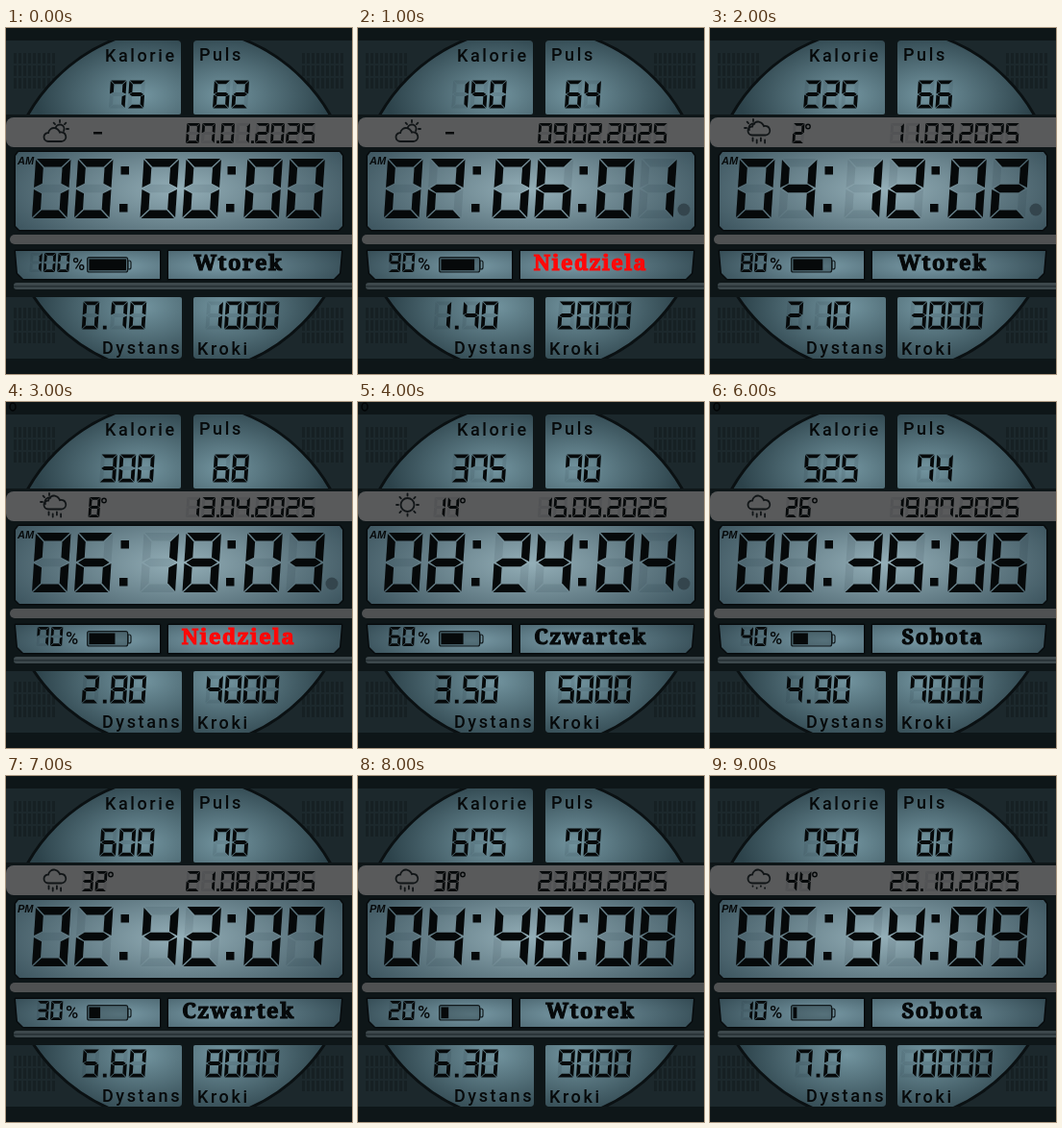
An HTML page with a canvas for the animation above (10000 ms loop, 360 by 360 pixels).

```html
<!DOCTYPE html>
<html lang="pl">
<head>
<meta charset="utf-8">
<title>Watch face</title>
<style>
  html, body { margin: 0; width: 100%; height: 100%; overflow: hidden; background: #0c1315; }
  canvas { display: block; }
</style>
</head>
<body>
<canvas id="face" width="360" height="360"></canvas>
<script>
const ctx = document.getElementById('face').getContext('2d');
const INK = '#06090a';
const GHOST = 'rgba(10, 25, 32, 0.09)';
const SLANT = 0.065;
const DIGITS = ['abcdef', 'bc', 'abged', 'abgcd', 'fgbc', 'afgcd', 'afgedc', 'fabc', 'abcdefg', 'abcdfg'];
const WEEKDAYS = ['Niedziela', 'Poniedziałek', 'Wtorek', 'Środa', 'Czwartek', 'Piątek', 'Sobota'];
const WEATHER = ['partly', 'partly', 'shower', 'shower', 'sun', 'sun', 'rain', 'rain', 'rain', 'snow'];
const pad = n => String(n).padStart(2, '0');

function polygon(points, color) {
  ctx.beginPath();
  points.forEach(([x, y]) => ctx.lineTo(x, y));
  ctx.closePath();
  ctx.fillStyle = color;
  ctx.fill();
}

function box(x, y, w, h, r, fill, stroke) {
  ctx.beginPath();
  ctx.roundRect(x, y, w, h, r);
  if (fill) { ctx.fillStyle = fill; ctx.fill(); }
  if (stroke) { ctx.strokeStyle = stroke; ctx.stroke(); }
}

function label(text, x, y, font, { color = INK, align = 'left', spacing = 0, weight = 0 } = {}) {
  ctx.font = font;
  ctx.textAlign = align;
  ctx.letterSpacing = spacing + 'px';
  ctx.fillStyle = ctx.strokeStyle = color;
  ctx.fillText(text, x, y);
  if (weight) {
    ctx.lineWidth = weight;
    ctx.strokeText(text, x, y);
  }
}

function segments(w, h, t) {
  const m = h / 2, gap = t * 0.12;
  const top = [[gap, 0], [w - gap, 0], [w - t - gap, t], [t + gap, t]];
  const side = [[w, gap], [w, m - gap], [w - t, m - t / 2 - gap], [w - t, t + gap]];
  const flipX = p => p.map(([x, y]) => [w - x, y]);
  const flipY = p => p.map(([x, y]) => [x, h - y]);
  return {
    a: top, b: side, c: flipY(side), d: flipY(top), e: flipX(flipY(side)), f: flipX(side),
    g: [[2 * gap, m], [t, m - t / 2], [w - t, m - t / 2], [w - 2 * gap, m], [w - t, m + t / 2], [t, m + t / 2]]
  };
}

function digit(value, x, y, w, h, t) {
  ctx.save();
  ctx.transform(1, 0, -SLANT, 1, x + h * SLANT, y);
  for (const [name, points] of Object.entries(segments(w, h, t)))
    polygon(points, DIGITS[value].includes(name) ? INK : GHOST);
  ctx.restore();
}

// Draws digits and dots, returning the x position after the last one.
function number(text, x, y, h, pitch, dot, t) {
  for (const char of text) {
    if (char === '.') {
      ctx.fillStyle = INK;
      ctx.fillRect(x + dot / 2 - t / 2 - 0.5, y + h - t, t, t);
      x += dot;
    } else {
      digit(+char, x, y, pitch - h * SLANT - 1, h, t);
      x += pitch;
    }
  }
  return x;
}

function centred(text, cx, y) {
  const pitch = 19.5, dot = 10;
  const width = [...text].reduce((sum, c) => sum + (c === '.' ? dot : pitch), 0);
  number(text, cx - width / 2, y, 29, pitch, dot, 3.8);
}

function glow(cx, cy, rx, ry, inner, outer) {
  ctx.save();
  ctx.translate(cx, cy);
  ctx.scale(rx, ry);
  const g = ctx.createRadialGradient(0, 0, 0, 0, 0, 1);
  g.addColorStop(0, inner);
  g.addColorStop(1, outer);
  ctx.fillStyle = g;
  ctx.fillRect(-3, -3, 6, 6);
  ctx.restore();
}

function dialPanel(x, y, w, h, corners, cx, cy) {
  ctx.save();
  ctx.beginPath();
  ctx.roundRect(x, y, w, h, corners);
  ctx.clip();
  ctx.fillStyle = '#1c282c';
  ctx.fillRect(x, y, w, h);
  ctx.fillStyle = '#162023';
  const gridX = x < 180 ? 8 : 308, gridY = y < 180 ? 26 : 291;
  for (let i = 0; i < 9; i++)
    for (let j = 0; j < 3; j++) ctx.fillRect(gridX + i * 5, gridY + j * 13, 3, 11);
  ctx.beginPath();
  ctx.arc(180, 180, 181, 0, 7);
  ctx.save();
  ctx.clip();
  glow(cx, cy, 112, 68, '#72949f', '#2c424a');
  ctx.restore();
  ctx.strokeStyle = '#0a1012';
  ctx.lineWidth = 3;
  ctx.stroke();
  ctx.restore();
}

function panel(points, cx, cy, rx, ry, inner, outer) {
  ctx.save();
  ctx.beginPath();
  points.forEach(([x, y]) => ctx.lineTo(x, y));
  ctx.closePath();
  ctx.lineJoin = 'round';
  ctx.lineWidth = 3;
  ctx.strokeStyle = '#070b0d';
  ctx.stroke();
  ctx.clip();
  glow(cx, cy, rx, ry, inner, outer);
  ctx.restore();
}

function background() {
  ctx.fillStyle = '#0e1618';
  ctx.fillRect(0, 0, 360, 360);
  dialPanel(0, 13, 182, 77, [0, 4, 2, 0], 142, 70);
  dialPanel(195, 13, 165, 77, [4, 0, 0, 2], 226, 70);
  dialPanel(0, 280, 183, 64, [0, 2, 4, 0], 142, 290);
  dialPanel(195, 280, 165, 64, [2, 0, 0, 4], 226, 290);
  box(0, 93, 364, 31, [8, 0, 0, 8], '#595a5b');
  box(4, 215, 360, 10, [5, 0, 0, 5], '#4f5152');
  box(8, 265, 356, 7, [3, 0, 0, 3], '#3d484c');
  ctx.fillStyle = '#263034';
  ctx.fillRect(8, 268, 352, 1.5);
  panel([[13, 129], [347, 129], [350, 133], [350, 206], [346, 210], [14, 210], [10, 206], [10, 133]],
    180, 168, 205, 78, '#94afb8', '#3b535d');
  panel([[10, 232], [160, 232], [160, 261], [18, 261], [12, 255]], 118, 248, 130, 34, '#7899a5', '#334a53');
  panel([[169, 232], [349, 232], [347, 255], [341, 261], [169, 261]], 222, 248, 145, 34, '#7899a5', '#334a53');
  const font = '500 18px Roboto, sans-serif', spacing = 2.6;
  label('Kalorie', 103, 35, font, { spacing });
  label('Puls', 201, 34, font, { spacing });
  label('Dystans', 100, 339, font, { spacing });
  label('Kroki', 199, 340, font, { spacing });
}

function sun(x, y, r, from, to) {
  ctx.beginPath();
  ctx.arc(x, y, r, from, to);
  ctx.stroke();
  for (let a = Math.PI / 4 * Math.ceil(from / (Math.PI / 4)); a <= to; a += Math.PI / 4) {
    ctx.beginPath();
    ctx.moveTo(x + Math.cos(a) * (r + 2.5), y + Math.sin(a) * (r + 2.5));
    ctx.lineTo(x + Math.cos(a) * (r + 4.5), y + Math.sin(a) * (r + 4.5));
    ctx.stroke();
  }
}

function cloud(x, y) {
  ctx.beginPath();
  ctx.moveTo(x + 5, y + 14);
  ctx.arc(x + 5, y + 9.5, 4.5, Math.PI / 2, Math.PI * 1.45);
  ctx.arc(x + 11, y + 6, 6, Math.PI * 1.05, Math.PI * 1.85);
  ctx.arc(x + 18.5, y + 9.2, 4.8, Math.PI * 1.4, Math.PI / 2);
  ctx.closePath();
  ctx.stroke();
}

function weatherIcon(kind) {
  ctx.strokeStyle = '#111517';
  ctx.lineWidth = 1.8;
  ctx.lineCap = 'round';
  if (kind === 'sun') {
    sun(51.5, 107, 7, 0, Math.PI * 1.99);
  } else if (kind === 'partly') {
    sun(56, 105, 4.5, Math.PI * 1.1, Math.PI * 2.15);
    cloud(39, 104);
  } else {
    if (kind === 'shower') sun(45, 104, 4.5, Math.PI * 0.85, Math.PI * 1.6);
    cloud(39, 97.5);
    for (let i = 0; i < 4; i++) {
      const x = 44.5 + i * 4.2, y = 114.5 + (i % 2) * 2;
      ctx.beginPath();
      ctx.moveTo(x, y);
      ctx.lineTo(x, y + (kind === 'snow' ? 0.3 : 3));
      ctx.stroke();
    }
  }
  ctx.lineCap = 'butt';
}

function colon(x) {
  ctx.fillStyle = INK;
  ctx.fillRect(x + 1.5, 144, 8.5, 8.5);
  ctx.fillRect(x, 183, 8.5, 8.5);
}

function pair(value, x) {
  [...pad(value)].forEach((char, i) => digit(+char, x + i * 44, 136, 36.5, 62, 8.4));
}

function clock(step) {
  pair(2 * step % 12, 27);
  colon(118);
  pair(6 * step, 139.5);
  colon(229);
  pair(step, 247.3);
  label(step < 6 ? 'AM' : 'PM', 12, 142, 'italic bold 11px "Liberation Sans", sans-serif');
}

function statusMarks(step) {
  if (step >= 1 && step <= 4) {
    ctx.beginPath();
    ctx.arc(339, 189, 6.5, 0, 7);
    ctx.fillStyle = '#34454d';
    ctx.fill();
  }
  if (step >= 3 && step <= 6) {
    ctx.beginPath();
    ctx.ellipse(7, 5, 3, 4, 0, 0, 7);
    ctx.strokeStyle = '#030506';
    ctx.lineWidth = 1.5;
    ctx.stroke();
  }
}

function temperature(value) {
  if (value < 0) {
    ctx.fillStyle = INK;
    ctx.fillRect(91, 108, 9, 2.5);
    return;
  }
  const text = String(value);
  const x = number(text, 92.5 - text.length * 7, 99, 21, 14, 0, 2.8);
  ctx.beginPath();
  ctx.arc(x + 2.5, 102.5, 2.2, 0, 7);
  ctx.strokeStyle = INK;
  ctx.lineWidth = 1.4;
  ctx.stroke();
}

function battery(percent) {
  const text = String(percent), pitch = 14.4;
  const x = number(text, 46 - text.length * pitch / 2, 234, 20, pitch, 0, 2.8);
  label('%', x + 1.5, 252, '500 18px Roboto, sans-serif');
  ctx.lineWidth = 1.2;
  box(84.6, 238.6, 42, 15.4, 2, 'rgba(8, 20, 26, 0.3)', '#11191c');
  box(127, 242, 3, 9, [0, 2, 2, 0], null, '#11191c');
  ctx.fillStyle = INK;
  ctx.fillRect(86.5, 240.5, 38.5 * percent / 100, 11.6);
}

function draw(step) {
  background();
  const day = 7 + 2 * step, month = step + 1;
  const weekday = new Date(2025, step, day).getDay();
  centred(String(75 * (step + 1)), 126.5, 54.5);
  centred(String(62 + 2 * step), 234.5, 54.5);
  centred(step === 9 ? '7.0' : (0.7 * (step + 1)).toFixed(2), 113, 284.5);
  centred(String(1000 * (step + 1)), 246.5, 284.5);
  number(`${pad(day)}.${pad(month)}.2025`, 187, 99, 21, 16, 4, 2.8);
  weatherIcon(WEATHER[step]);
  temperature(6 * step - 10);
  clock(step);
  statusMarks(step);
  battery(100 - 10 * step);
  label(WEEKDAYS[weekday], 242, 251.5, '900 22px "Noto Serif", serif',
    { color: weekday === 0 ? '#ff0808' : INK, align: 'center', spacing: 1.5, weight: 1.1 });
}

function frame() {
  draw(Math.floor(performance.now() / 1000) % 10);
  requestAnimationFrame(frame);
}
frame();
</script>
</body>
</html>
```
